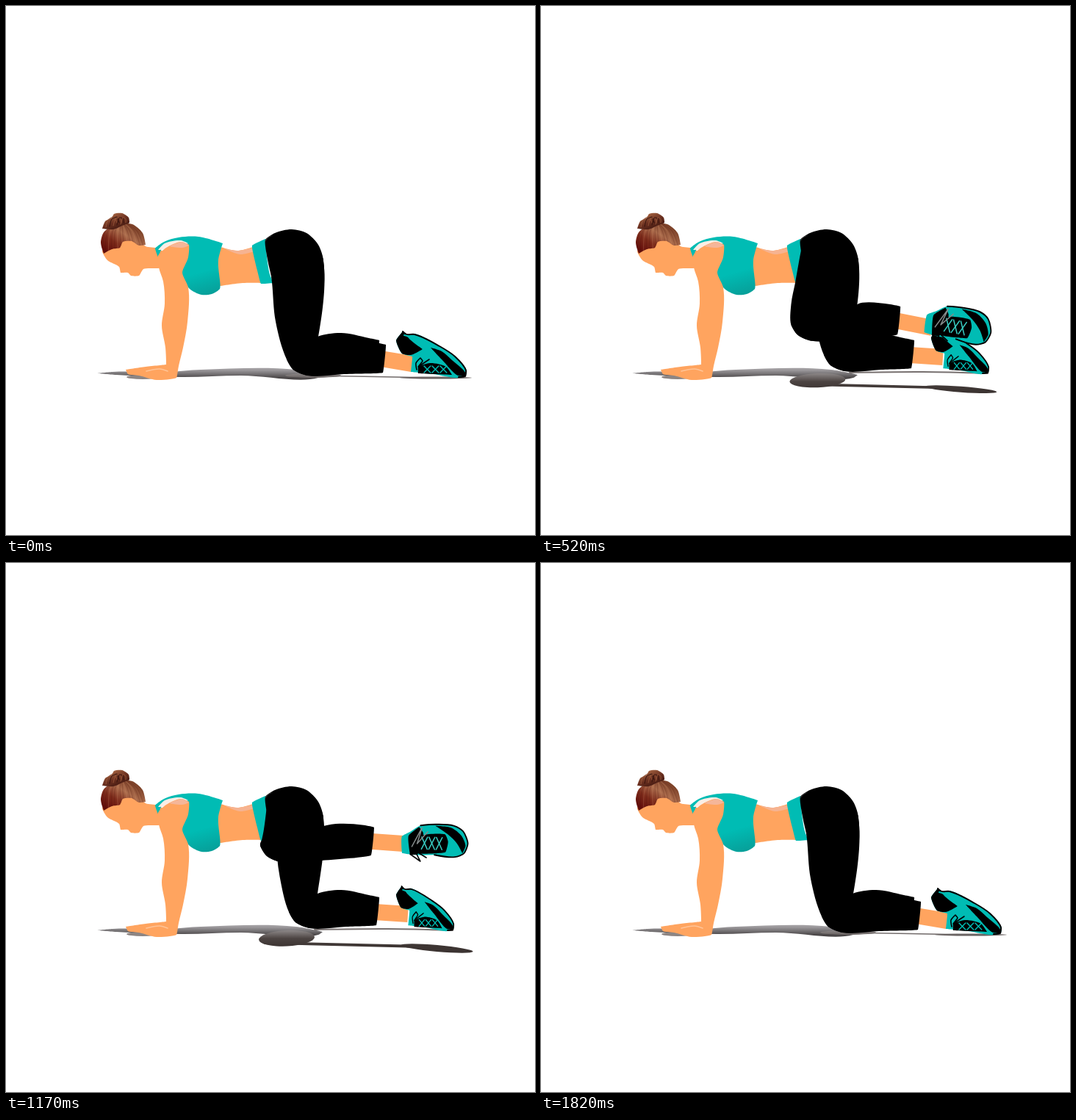
These frames come from a looping animation (720 px wide and 720 px high, 2080 ms). An HTML page with a canvas:

```html
<!DOCTYPE html>
<html lang="en">
<head>
<meta charset="utf-8">
<title>Side leg raise</title>
<style>
html, body { margin: 0; width: 100%; height: 100%; overflow: hidden; background: #fff; }
canvas { display: block; width: 720px; height: 720px; }
</style>
</head>
<body>
<canvas id="stage" width="720" height="720"></canvas>
<script>
const ctx = document.getElementById('stage').getContext('2d');
const SKIN = '#ffa45f', TEAL = '#00bcb4', BLACK = '#000';
const STEP = 130, STEPS = 16, HALF = 7;
const { sin, cos, PI, max, min, floor, hypot } = Math;

// Hip angle in radians: a steady lift, then an eased return.
function hipAngle(step) {
  const ease = u => (1 - cos(PI * u)) / 2;
  const up = step / HALF, down = max(0, 2 - up);
  const share = up < 1 ? .6 * up + .4 * ease(up) : ease(down);
  return share * 95 * PI / 180;
}

// Curve through x, y pairs; bends smoothly but keeps sharp turns sharp.
function trace(p, closed = true) {
  const n = p.length / 2;
  const at = i => {
    i = closed ? (i + n) % n : max(0, min(n - 1, i));
    return [p[2 * i], p[2 * i + 1]];
  };
  const slope = i => {
    const [a, b, c] = [at(i - 1), at(i), at(i + 1)];
    const [ux, uy, vx, vy] = [b[0] - a[0], b[1] - a[1], c[0] - b[0], c[1] - b[1]];
    const lu = hypot(ux, uy) || 1, lv = hypot(vx, vy) || 1;
    const k = max(0, (ux * vx + uy * vy) / (lu * lv));
    return [(ux / lu + vx / lv) * k / 6, (uy / lu + vy / lv) * k / 6];
  };
  ctx.beginPath();
  ctx.moveTo(...at(0));
  for (let i = 0; i < (closed ? n : n - 1); i++) {
    const [b, c, s, e] = [at(i), at(i + 1), slope(i), slope(i + 1)];
    const d = hypot(c[0] - b[0], c[1] - b[1]);
    ctx.bezierCurveTo(b[0] + s[0] * d, b[1] + s[1] * d, c[0] - e[0] * d, c[1] - e[1] * d, ...c);
  }
}
function shape(points, fill) {
  trace(points);
  ctx.fillStyle = fill;
  ctx.fill();
}
function line(points, color, width) {
  trace(points, false);
  ctx.strokeStyle = color;
  ctx.lineWidth = width;
  ctx.stroke();
}
function oval(x, y, rx, ry, turn, fill) {
  ctx.beginPath();
  ctx.ellipse(x, y, rx, ry, turn, 0, 2 * PI);
  ctx.fillStyle = fill;
  ctx.fill();
}
function ramp(x0, y0, x1, y1, ...colors) {
  const g = ctx.createLinearGradient(x0, y0, x1, y1);
  colors.forEach((c, i) => g.addColorStop(i / (colors.length - 1), c));
  return g;
}
function placed(x, y, turn, sx, sy, draw) {
  ctx.save();
  ctx.translate(x, y);
  ctx.rotate(turn);
  ctx.scale(sx, sy);
  draw();
  ctx.restore();
}
function laces(x, y, gap, height, color) {
  for (let i = 0; i < 3; i++) {
    const left = x + i * gap, right = left + gap * .8;
    line([left, y, right, y + height], color, 1.5);
    line([right, y, left, y + height], color, 1.5);
  }
}

// Shoe on the floor, seen from the side; x, y is its upper left corner.
function sideShoe(x, y, w, h) {
  placed(x, y, 0, w / 96, h / 63, () => {
    shape([0,12, 9,0, 14,4, 25,3, 59,20, 80,34, 96,53, 95,60, 86,63, 50,58, 20,55, 22,34, 8,30], TEAL);
    line([9,0, 14,4, 25,4, 59,20, 80,34, 95,53, 94,61, 85,62], BLACK, 2);
    shape([0,12, 9,0, 20,12, 36,24, 20,32, 8,30], BLACK);
    line([11,5, 20,8, 29,16], TEAL, 2);
    shape([47,22, 62,27, 76,39, 94,56, 94,61, 84,60, 62,38], BLACK);
    shape([30,48, 46,43, 68,48, 76,59, 30,57], BLACK);
    laces(38, 47, 11, 9, TEAL);
    line([28,52, 27,43, 33,36, 36,40, 30,48, 45,38], BLACK, 1.6);
  });
}

// Lifted shoe, seen from above; x, y is its centre.
function topShoe(x, y, h, turn) {
  placed(x, y, turn, 1, h / 43, () => {
    shape([-45,-5, -33,-12, -20,-20, 0,-22, 25,-21, 38,-14, 45,2, 40,15, 28,20, 0,18, -23,19, -44,17], TEAL);
    line([-20,-20, 0,-22, 25,-21, 38,-14, 45,2, 40,15, 28,20, 0,18], BLACK, 1.8);
    shape([-36,-6, -22,-18, -16,-10, -23,18, -33,19], BLACK);
    shape([-25,-5, -8,-9, 14,-9, 18,0, 15,14, -21,17], BLACK);
    shape([0,-20, 22,-18, 36,-8, 42,5, 38,15, 30,2, 18,-9], BLACK);
    laces(-18, -5, 10, 16, '#38cbc1');
    line([-31,8, -18,-17, -24,4, -10,-12], '#858b8b', 1.5);
    line([-33,18, -19,27, -27,13, -11,22], BLACK, 1.6);
  });
}

// Thigh and lower leg; knee is its front x and lowest y.
function trousers(waist, kneeX, kneeY, cuff, tilt, bow) {
  const crease = [424, kneeY - 47], waistY = min(376, kneeY - 30);
  shape([356,325, 425,328, 432,347, ...crease, kneeX + 28,kneeY, kneeX + 9,kneeY - 8, kneeX,kneeY - 22,
    (waist + kneeX) / 2 - bow,(waistY + kneeY - 20) / 2, waist,waistY], BLACK);
  shape([kneeX,kneeY - 22, kneeX + 9,kneeY - 8, kneeX + 28,kneeY, kneeX + 78,kneeY - 2,
    cuff - 2,kneeY - 4 + tilt, cuff + 2,kneeY - 42 + tilt, cuff - 12,kneeY - 45 + tilt, cuff - 50,kneeY - 52, ...crease], BLACK);
}
function ankle(x0, y0, x1, y1, width) {
  ctx.lineCap = 'butt';
  line([x0, y0, x1, y1], SKIN, width);
  ctx.lineCap = 'round';
}

function nearLeg(angle) {
  const sway = sin(1.5 * angle) ** 1.5;
  const tilt = 7 * sin(4 * angle);
  const kneeX = 382 - 42 * sway;
  const kneeY = 374 + 129 * cos(angle) + 10 * sin(2 * angle);
  const cuff = 515 - 37 * sway + 20 * (1 - cos(angle));
  const raised = angle > .65;
  const w = 96 - 27 * sin(angle), h = 63 + 33 * sin(angle);
  const footX = cuff + 87 - 10 * cos(angle), footY = kneeY - 33 + 20 * cos(angle);
  return {
    kneeX,
    toe: raised ? footX + 45 : 531 + w,
    draw() {
      const heel = raised ? [footX - 36, footY + 4] : [553, 443 + h * .7];
      ankle(cuff - 5, kneeY - 23 + tilt, ...heel, 22 + max(0, 2 * tilt));
      trousers(362 - 16 * sway, kneeX, kneeY, cuff, tilt, 5 * cos(angle));
      if (raised) topShoe(footX, footY, 43 + 7 * cos(angle), .6 * cos(angle) ** 2);
      else sideShoe(531, 443, w, h);
    }
  };
}
function farLeg(visible) {
  if (visible) {
    ankle(502, 475, 547, 478, 22);
    sideShoe(531, 440, 79, 61);
  }
  trousers(366, 385, 497, 506, 0, 3);
}

function floorShadow(angle, { kneeX, toe }) {
  const spread = sin(angle);
  shape([124,500, 145,498, 220,498, 265,495, 395,495, 431,502, 425,506, 320,503, 240,505, 150,502],
    ramp(0, 495, 0, 506, '#a09da0', '#777476', '#4b4748'));
  oval(186, 505, 22, 3, 0, '#8d8583');
  if (spread > .5) line([420,499, 520,498, 608,500], '#77706f', 2);

  const dark = ramp(0, 500, 0, 522, '#8c8787', '#4c4442', '#3c3432');
  const kneeShade = [kneeX + 36, 503 + 8 * spread], footShade = [toe - 42, 506 + 19 * spread];
  oval(...kneeShade, 38, 3 + 8 * spread, -.05 * spread, dark);
  line([kneeShade[0], kneeShade[1] + 7 * spread, footShade[0], footShade[1] - 2 * spread], dark, 1.5 + 2.5 * spread);
  oval(...footShade, 49, 1.5 + 3 * spread, .09 * spread, dark);
}

function hair() {
  const cap = [129,322, 133,308, 150,297, 172,297, 186,309, 190,325, 181,326, 171,320, 159,321, 155,329, 144,331, 133,337];
  shape(cap, ramp(168, 296, 142, 336, '#7d4229', '#ab6c4c', '#7d2b1b', '#640f0b'));
  ctx.save();
  trace(cap);
  ctx.clip();
  for (let i = 0; i < 15; i++) {
    const x = 126 + i * 4.5;
    line([152 + i * .7,295, (x + 153) / 2 + i - 7,306, x,334], i % 3 ? 'rgba(72,18,10,.2)' : 'rgba(218,158,119,.2)', 1.3);
  }
  ctx.restore();
  shape([131,303, 135,293, 144,288, 147,283, 158,282, 167,288, 168,295, 158,299, 146,304],
    ramp(145, 283, 154, 304, '#a46341', '#6b3020', '#421810'));
  for (let i = 0; i < 5; i++) {
    line([136 + i * 5,301 - i, 139 + i * 5,291 - i, 147 + i * 4,286 + i, 151 + i * 3,295], i % 2 ? '#32110c' : '#955538', 1);
  }
}

function upperBody() {
  // Head and neck
  shape([131,334, 138,346, 154,355, 156,363, 166,363, 170,367, 181,367, 187,358, 212,356, 220,340,
    207,330, 190,327, 175,312, 145,318], SKIN);
  hair();

  // Waist
  shape([286,326, 315,333, 342,326, 352,377, 322,377, 286,382], SKIN);
  shape([297,330, 315,333, 337,329, 337,334, 318,338], '#f6b391');

  // Top
  shape([203,330, 215,321, 235,315, 262,314, 295,323, 289,346, 291,385, 280,392, 266,393, 250,385, 240,368,
    239,350, 240,326, 214,327, 207,342], ramp(258, 330, 276, 393, TEAL, TEAL, '#079f99'));
  shape([207,332, 216,323, 238,319, 248,323, 230,330], '#fbeee6');

  // Arm and hand
  shape([207,340, 218,329, 238,321, 249,325, 248,342, 240,363, 248,383, 247,430, 241,465, 235,490, 232,506,
    205,509, 181,503, 166,501, 163,495, 190,491, 218,488, 217,465, 212,435, 216,405, 214,375, 208,356], SKIN);
  shape([222,327, 240,321, 249,326, 240,329], '#f5b699');
  line([191,497, 209,494, 220,497], '#ffc497', 1.5);

  // Waistband
  shape([335,326, 353,317, 359,365, 364,377, 347,378, 342,360], TEAL);
}

function hips() {
  shape([353,318, 366,309, 389,304, 409,309, 425,325, 432,347, 427,372, 364,376, 356,345], BLACK);
  line([353,320, 357,315, 361,313], '#4c4c4c', .8);
}

function draw(time) {
  const angle = hipAngle(floor(time / STEP) % STEPS);
  const leg = nearLeg(angle);
  ctx.fillStyle = '#fff';
  ctx.fillRect(0, 0, 720, 720);
  floorShadow(angle, leg);
  farLeg(angle > .5);
  upperBody();
  hips();
  leg.draw();
}

ctx.lineCap = ctx.lineJoin = 'round';
const start = performance.now();
function tick() {
  draw(performance.now() - start);
  requestAnimationFrame(tick);
}
tick();
</script>
</body>
</html>
```
